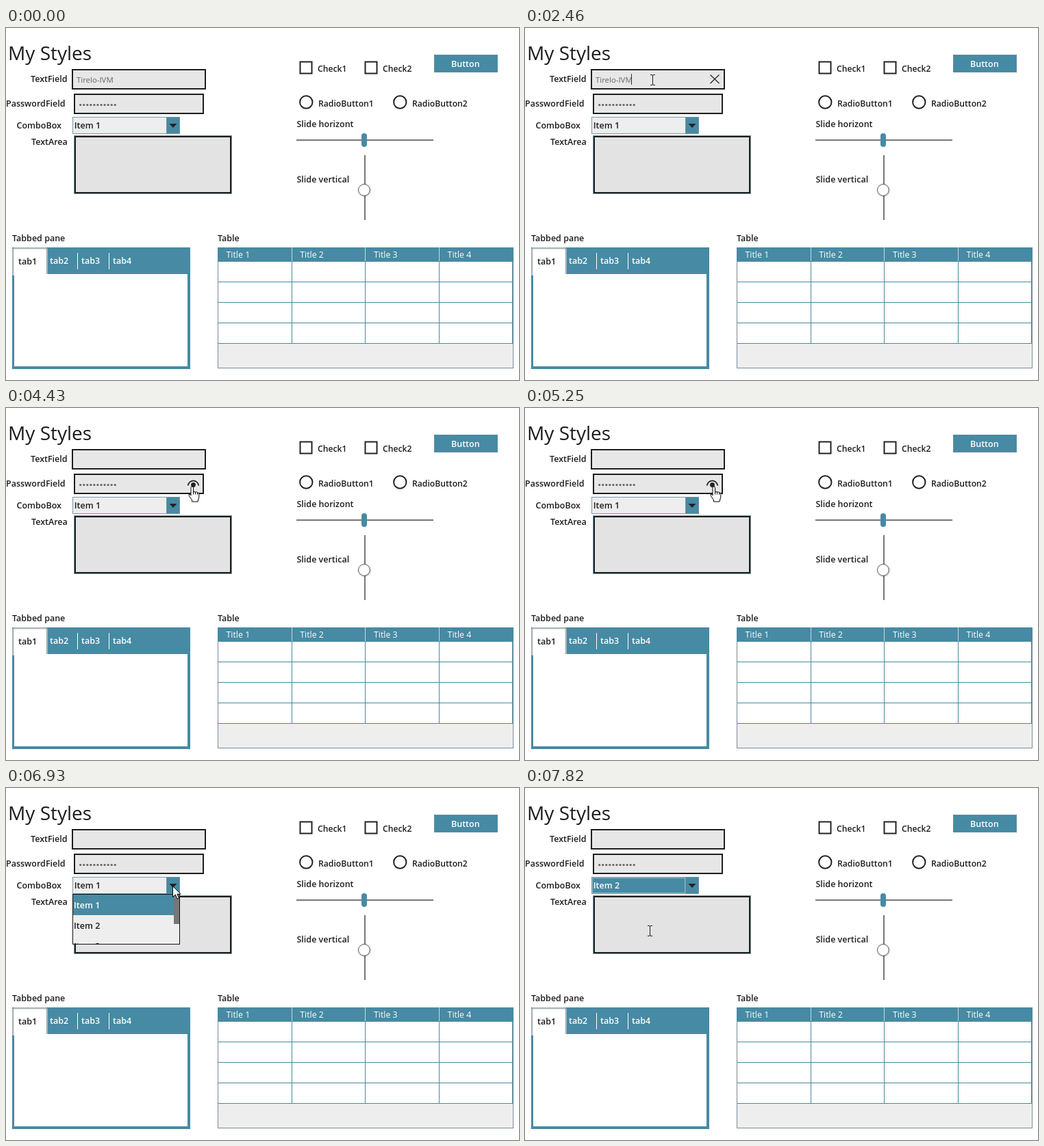
Write an HTML page that moves like this. It is 749 px wide and 515 px high and loops after 8 s.

```html
<!DOCTYPE html>
<html lang="en">
<head>
<meta charset="utf-8">
<title>My Styles</title>
<style>
  html, body { margin: 0; width: 100%; height: 100%; overflow: hidden; background: #fff; }
  svg { display: block; width: 749px; height: 515px; }
  text { font: 600 12.5px "Open Sans", "Noto Sans", sans-serif; fill: #1c1c1c; white-space: pre; }
  .title { font-size: 28px; font-weight: 400; }
  .small { font-size: 12.2px; }
  .field { font-size: 11.4px; font-weight: 400; fill: #666; }
  .head { font-size: 12.4px; font-weight: 400; fill: #fff; }
  .white { fill: #fff; }
  .teal { fill: #478aa3; }
  .box { fill: #e7e7e7; stroke: #1e1e1e; stroke-width: 2; }
  .open { fill: #fff; stroke: #222; stroke-width: 2; }
  .line { fill: none; stroke: #222; }
  .cursor { fill: #fff; stroke: #000; stroke-linejoin: round; }
</style>
</head>
<body>
<svg viewBox="0 0 749 515" xmlns="http://www.w3.org/2000/svg">
  <defs>
    <filter id="shade" x="-20%" y="-20%" width="140%" height="140%">
      <feDropShadow dx="0.5" dy="0.5" stdDeviation="0.8" flood-opacity=".4"/>
    </filter>
    <clipPath id="popupClip"><rect x="98" y="156" width="155" height="72"/></clipPath>
  </defs>

  <text class="title" x="3" y="47">My Styles</text>

  <text x="36" y="79">TextField</text>
  <rect class="box" x="97" y="61" width="194" height="28"/>
  <text class="field" id="name" x="103" y="80"></text>
  <path id="caret" d="M0 67v16" stroke="#333" shape-rendering="crispEdges"/>
  <path id="clear" class="line" stroke-width="1.2" d="M270.5 68.5l13 12.5m0-12.5l-13 12.5"/>

  <text x="0" y="115">PasswordField</text>
  <rect class="box" x="100" y="97" width="188" height="28"/>
  <g id="dots" fill="#606060"></g>
  <text class="field" id="plain" x="106" y="116">password123</text>
  <g id="eye">
    <path class="line" stroke-width="1.8" d="M265.5 113.500C268.500 104 278.500 104 281.500 113.500"/>
    <circle cx="273.5" cy="112.5" r="3.4" fill="#222"/>
    <path id="slash" class="line" stroke-width="1.6" d="M266 105l15 15"/>
  </g>

  <text x="37" y="171">TextArea</text>
  <rect x="99.5" y="157.5" width="230" height="85" fill="#e3e3e3" stroke="#7396a5"/>
  <rect x="101" y="159" width="227" height="82" fill="#e3e3e3" stroke="#1e1e1e" stroke-width="2"/>

  <text x="15.5" y="147">ComboBox</text>
  <rect id="combo" x="97.5" y="130.5" width="156" height="24" stroke="#7a99a8"/>
  <rect id="focus" x="98.5" y="131.5" width="135" height="22" fill="none" stroke="#8db9c9"/>
  <rect class="teal" x="234.5" y="130.5" width="19" height="24" stroke="#6d93a3"/>
  <path d="M238.500 140h11l-5.500 6z" fill="#222"/>
  <text id="choice" x="99.800" y="147"></text>

  <g id="popup">
    <rect x="97.5" y="155.5" width="156" height="73" fill="#eee" stroke="#111"/>
    <g clip-path="url(#popupClip)">
      <rect class="teal" id="hover" x="98" width="147" height="30"/>
      <g id="items"></g>
      <rect x="245" y="156" width="8" height="43" fill="#777"/>
    </g>
  </g>

  <g id="choices"></g>
  <rect x="625.500" y="39.500" width="92" height="25" class="teal" stroke="#5a8fa5"/>
  <text class="white" x="650" y="57">Button</text>

  <text x="424.5" y="145">Slide horizont</text>
  <path d="M424 164h200" stroke="#777" stroke-width="2"/>
  <rect class="teal" x="519" y="154" width="8" height="20" rx="4"/>
  <text x="424.5" y="226">Slide vertical</text>
  <path d="M524 186v95" stroke="#777" stroke-width="2"/>
  <circle cx="522.9" cy="237" r="8.3" fill="#fff" stroke="#666" filter="url(#shade)"/>

  <text x="9" y="312">Tabbed pane</text>
  <rect class="teal" x="9" y="321" width="260" height="178"/>
  <rect x="12" y="360" width="253" height="135" fill="#fff"/>
  <g fill="#fff">
    <path d="M10 362v-37q0-3 3-3h44q3 0 3 3v35" stroke="#a9b4b8" stroke-width="2"/>
    <path d="M11.500 362v-36q0-2.500 2.500-2.500h42q2.500 0 2.500 2.500v36" stroke="#e4e4e4"/>
    <rect x="12" y="360" width="50" height="3"/>
  </g>
  <path d="M104.5 329v24m46-24v24" stroke="#fff"/>
  <g id="tabs"></g>

  <text x="309" y="312">Table</text>
  <rect x="309.5" y="321.5" width="431" height="176" fill="#fff" stroke="#7a8a94"/>
  <rect x="310" y="462" width="430" height="35" fill="#eee"/>
  <rect class="teal" x="309" y="321" width="432" height="21"/>
  <g id="table" shape-rendering="crispEdges"></g>

  <g id="pointer">
    <path class="cursor" id="arrow" d="M.5.500V16.500L4.300 13L7 19.200L9.500 18.200L7 12.200H12z"/>
    <g class="cursor" id="hand">
      <path d="M-2 1.500Q-2 0-.2 0T1.500 1.500V8Q3 6.800 4.600 8Q6.300 7.200 7.500 8.800Q9.500 8.400 9.800 10.300V15L8 22H-.5V19.800L-4.700 13.500Q-5.500 11-4 10.800L-2 13z"/>
      <path fill="none" d="M1.500 8v3.500m3-3.500v3.500m3-2.700v3"/>
    </g>
    <path class="line" id="beam" stroke="#111" d="M-3-7.500H-1Q.5-7.500.5-6Q.5-7.500 2-7.500H4M.5-6.500V6.500M-3 7.500H-1Q.5 7.500.5 6Q.5 7.500 2 7.500H4"/>
  </g>
</svg>

<script>
const $ = id => document.getElementById(id);
const NS = "http://www.w3.org/2000/svg";
const LOOP = 8000, STEP = 68.2;
const TEAL = "#478aa3";
const USER = "Tirelo-IVM";

function add(parent, tag, attrs, label) {
  const el = document.createElementNS(NS, tag);
  for (const k in attrs) el.setAttribute(k, attrs[k]);
  if (label) el.textContent = label;
  return $(parent).appendChild(el);
}

for (let i = 0; i < 11; i++) add("dots", "circle", { cx: 108.7 + 5.05 * i, cy: 112.5, r: 1.6 });

const items = [1, 2, 3].map(n =>
  add("items", "text", { x: 99, y: 146 + 30 * n }, "Item " + n));

[[429, 455, 1], [524, 550, 2]].forEach(([x, tx, n]) => {
  const shift = (n - 1) * 42;
  add("choices", "rect", { class: "open", x: x + 0.5, y: 49.5, width: 17, height: 17 });
  add("choices", "text", { class: "small", x: tx, y: 64 }, "Check" + n);
  add("choices", "circle", { class: "open", cx: x + 9.3 + shift, cy: 108.5, r: 9.2 });
  add("choices", "text", { class: "small", x: tx + 1 + shift, y: 115 }, "RadioButton" + n);
});

[18, 64, 110, 156].forEach((x, i) =>
  add("tabs", "text", { x, y: i ? 345 : 346, class: i ? "white" : "" }, "tab" + (i + 1)));

for (let i = 1; i < 5; i++)
  add("table", "path", { d: `M310 ${341.5 + 30 * i}h430`, stroke: TEAL });
[417.5, 524.5, 632.5, 739.5].forEach((x, i) => {
  add("table", "path", { d: `M${x} 342V461`, stroke: TEAL });
  if (i < 3) add("table", "path", { d: `M${x} 321V341`, stroke: "#c5d9e0" });
  add("table", "text", { class: "head", x: 321.5 + 107.7 * i, y: 336 }, "Title " + (i + 1));
});

// time, x, y, shape
const path = [
  [130, 608, 484, "arrow"], [480, 398, 268, "arrow"], [880, 197, 92, "arrow"],
  [950, 194, 80, "beam"], [1300, 190, 73, "beam"], [1970, 190, 73, "beam"],
  [2040, 187, 75, "beam"], [2190, 186, 76, "beam"], [2460, 186, 76, "beam"],
  [2740, 262, 76, "hand"], [2880, 282, 74, "hand"], [3740, 282, 74, "hand"],
  [3950, 278, 91, "arrow"], [4020, 276, 98, "hand"], [4430, 272, 115, "hand"],
  [4500, 276, 115, "hand"], [6440, 276, 115, "hand"], [6580, 264, 127, "arrow"],
  [6780, 243, 143, "arrow"], [6920, 243, 143, "arrow"], [7200, 192, 178, "arrow"],
  [7340, 188, 181, "arrow"], [7560, 182, 207, "arrow"], [7750, 182, 209, "beam"],
  [LOOP, 182, 209, "beam"]
];

// on/off intervals
const shown = {
  clear: [[950, 3440]],
  caret: [[1500, 1970], [2460, 3140], [3540, 4040], [4570, 5120], [5520, 6110], [6580, 6850]],
  eye: [[4020, 6580]],
  plain: [[4570, 5120], [5520, 6110]],
  slash: [[4570, 5120], [5520, 6110]],
  popup: [[6850, 7700]],
  focus: [[7700, LOOP]]
};

const show = (id, on) => $(id).style.display = on ? "" : "none";

function drawPointer(t) {
  const i = path.findLastIndex(k => k[0] <= t);
  show("pointer", i >= 0);
  if (i < 0) return;
  const [t0, x0, y0, shape] = path[i];
  const [t1, x1, y1] = path[i + 1];
  const p = Math.floor((t - t0) / STEP) * STEP / (t1 - t0);
  const x = Math.round(x0 + (x1 - x0) * p), y = Math.round(y0 + (y1 - y0) * p);
  $("pointer").setAttribute("transform", `translate(${x} ${y})`);
  ["arrow", "hand", "beam"].forEach(s => show(s, s === shape));
}

function draw(t) {
  for (const id in shown) show(id, shown[id].some(([a, b]) => t >= a && t < b));
  show("dots", $("plain").style.display === "none");

  const erased = t >= 2640, empty = t >= 3340;
  $("name").textContent = empty ? "" : erased ? USER.slice(0, -1) : USER;
  $("caret").setAttribute("transform", `translate(${empty ? 103.5 : erased ? 145.5 : 155.5} 0)`);

  const picked = t >= 7700, over = t >= 7410 ? 1 : 0;
  $("choice").textContent = picked ? "Item 2" : "Item 1";
  $("choice").style.fill = picked ? "#fff" : "";
  $("combo").setAttribute("fill", picked ? TEAL : "#eee");
  $("hover").setAttribute("y", 156 + 30 * over);
  items.forEach((el, i) => el.style.fill = i === over ? "#fff" : "");

  drawPointer(t);
}

const start = performance.now();
function tick() {
  draw((performance.now() - start) % LOOP);
  requestAnimationFrame(tick);
}
tick();
</script>
</body>
</html>
```
